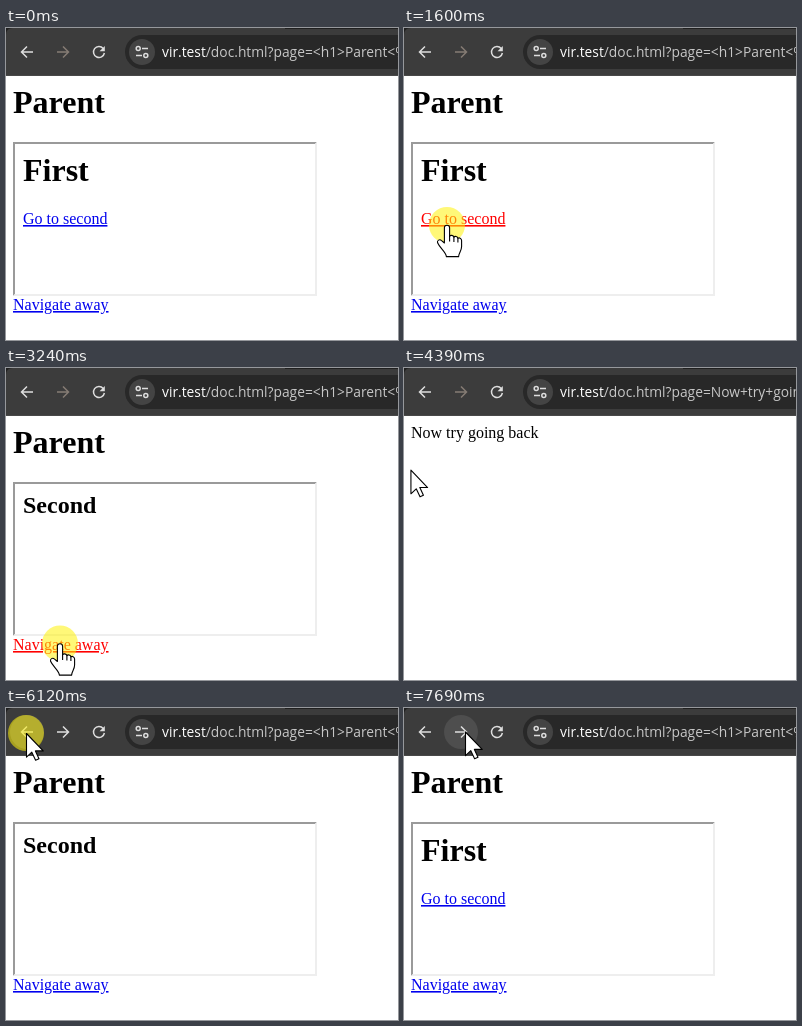
Recreate the animation shown at these times as an HTML page. Size 392x312 px, loop 8 s.

```html
<!DOCTYPE html>
<html lang="en">
<head>
<meta charset="utf-8">
<title>Frame history</title>
<style>
  html, body { margin: 0; width: 100%; height: 100%; overflow: hidden; background: #fff; }
  svg { display: block; width: 392px; height: 312px; }
  text { font-family: "Liberation Serif", "Times New Roman", serif; font-size: 16px; white-space: pre; }
  .h1 { font-size: 32px; font-weight: bold; }
  .h2 { font-size: 24px; font-weight: bold; }
  .link { fill: #00e; text-decoration: underline; }
  .link.active { fill: #f00; }
  .url { font-family: "Open Sans", "Noto Sans", sans-serif; font-size: 13.8px; fill: #c7c7c7; }
  .url tspan { fill: #fff; }
  .icon { fill: none; stroke: #dedede; stroke-width: 1.5; }
  .icon.disabled { stroke: #857c74; }
  .cursor { fill: #fff; stroke: #000; stroke-width: 1.1; stroke-linejoin: round; }
</style>
</head>
<body>
<svg viewBox="0 0 392 312">
  <rect width="392" height="312" fill="#fff"/>

  <g id="parent">
    <text class="h1" x="7" y="85">Parent</text>
    <path d="M7 268V114H311L309 116H9V266Z" fill="#9a9a9a"/>
    <path d="M311 114V268H7L9 266H309V116Z" fill="#eee"/>
    <g id="first">
      <text class="h1" x="17" y="153">First</text>
      <text class="link" id="goLink" x="17" y="196">Go to second</text>
    </g>
    <text class="h2" id="second" x="17" y="145">Second</text>
    <text class="link" id="awayLink" x="7" y="282">Navigate away</text>
  </g>
  <text id="away" x="7" y="70">Now try going back</text>

  <rect width="392" height="48" fill="#1f1f1f"/>
  <path d="M0 48V7Q0 0 7 0H279V1H392V48Z" fill="#3c3c3c"/>
  <rect y="47" width="392" height="1" fill="#484848"/>
  <circle id="backGlow" cx="21" cy="24" r="17" fill="#fff" opacity="0"/>
  <circle id="nextGlow" cx="57" cy="24" r="17" fill="#fff" opacity="0"/>
  <path class="icon" d="M27 24H16M21 18.5L15.5 24L21 29.5"/>
  <path class="icon" id="next" d="M51 24H62M57 18.5L62.5 24L57 29.5"/>
  <path class="icon" d="M97.2 20.4A5.5 5.5 0 1 0 98.4 25"/>
  <path d="M98.8 18V23.2H93.6Z" fill="#dedede"/>

  <rect x="119" y="7" width="300" height="34" rx="17" fill="#282828"/>
  <circle cx="136" cy="24" r="13" fill="#444"/>
  <g class="icon">
    <circle cx="132.2" cy="20.4" r="2"/>
    <path d="M136 20.4H142M130 27.6H136"/>
    <circle cx="139.8" cy="27.6" r="2"/>
  </g>
  <text class="url" id="parentUrl" x="156" y="29"><tspan>vir.test</tspan>/doc.html?page=&lt;h1&gt;Parent&lt;%2Fh1&gt;</text>
  <text class="url" id="awayUrl" x="156" y="29"><tspan>vir.test</tspan>/doc.html?page=Now+try+going+back</text>

  <g id="pointer">
    <circle id="press" r="18" fill="#fff20a" fill-opacity=".55"/>
    <path class="cursor" id="arrow" d="M.5 .5V24.2L5.8 19.2L9.6 27.2L13 25.7L9.4 17.9H17.2Z"/>
    <g class="cursor" id="hand">
      <path d="M-2.6 18V2.8A2.6 2.6 0 0 1 2.6 2.8V11.4C3.2 9.8 6.6 10 6.9 12.2C7.8 10.8 10.6 11.3 10.9 13.4C12 12.4 14.6 13 14.6 15.6V21.5C14.6 26 11.8 27.5 11.6 31.6H-.6C-1 27-7.6 22.4-9.4 17.8C-10.2 15.4-7.4 13.8-5.4 15.6Z"/>
      <path d="M2.6 11V16.5M6.9 12V17M10.9 13.2V17.5" fill="none"/>
    </g>
  </g>
</svg>

<script>
const LOOP = 8000, HOLD = 100, CURSOR_LAG = 60, FADE = 460;
const HOVER = .09, RIPPLE = .16;
const $ = id => document.getElementById(id);
const show = (id, on) => $(id).style.display = on ? '' : 'none';

// One sweep of the mouse along a curve; it rests between sweeps.
function sweep(start, end, d) {
  const path = document.createElementNS('http://www.w3.org/2000/svg', 'path');
  path.setAttribute('d', d);
  return { start, end, path, length: path.getTotalLength() };
}
const sweeps = [
  sweep(180, 910, 'M349 311C270 250 140 150 75 193'),
  sweep(910, 1050, 'M75 193L41 197'),
  sweep(1270, 1350, 'M41 197H43'),
  sweep(2435, 2910, 'M44 197C80 212 75 255 54 275.5'),
  sweep(4030, 4780, 'M54 275.5C34 190 -22 80 20 25'),
  sweep(7300, 7690, 'M20 25L61 23.5')
];
const clicks = [
  { at: 1600, opens: 'second' },
  { at: 3240, opens: 'away' },
  { at: 5020, opens: 'second' },
  { at: 6120, opens: 'first' }
];

const easeOut = u => 1 - (1 - u) ** 1.8;
const latest = (list, passed) => list.filter(passed).pop();

function pointerAt(t) {
  const s = latest(sweeps, s => s.start <= t) || sweeps[0];
  const u = Math.min(1, Math.max(0, (t - s.start) / (s.end - s.start)));
  return s.path.getPointAtLength(s.length * easeOut(u));
}

function pageAt(t) {
  const click = latest(clicks, c => c.at + HOLD <= t);
  return click ? click.opens : 'first';
}

function draw(t) {
  const page = pageAt(t), away = page === 'away';
  show('parent', !away);
  show('parentUrl', !away);
  show('away', away);
  show('awayUrl', away);
  show('first', page === 'first');
  show('second', page === 'second');
  $('next').classList.toggle('disabled', t < clicks[2].at + HOLD);

  const { x, y } = pointerAt(t);
  const over = (left, top, right, bottom) => x >= left && x <= right && y >= top && y <= bottom;
  const click = latest(clicks, c => c.at <= t);
  const since = click ? t - click.at : Infinity;
  const pressed = since < HOLD;

  const seen = pageAt(t - CURSOR_LAG);
  const onGo = seen === 'first' && over(17, 183, 102, 201);
  const onAway = seen !== 'away' && over(7, 268, 102, 287);
  show('pointer', t >= 200);
  show('press', pressed);
  show('hand', onGo || onAway);
  show('arrow', !onGo && !onAway);
  $('pointer').setAttribute('transform', `translate(${x.toFixed(2)} ${y.toFixed(2)})`);
  $('goLink').classList.toggle('active', pressed && onGo);
  $('awayLink').classList.toggle('active', pressed && onAway);

  const ripple = RIPPLE + (HOVER - RIPPLE) * Math.min(1, since / FADE);
  $('backGlow').setAttribute('opacity', over(4, 7, 38, 41) ? ripple : 0);
  $('nextGlow').setAttribute('opacity', over(40, 7, 74, 41) ? HOVER : 0);
}

function tick() {
  draw(performance.now() % LOOP);
  requestAnimationFrame(tick);
}
tick();
</script>
</body>
</html>
```
